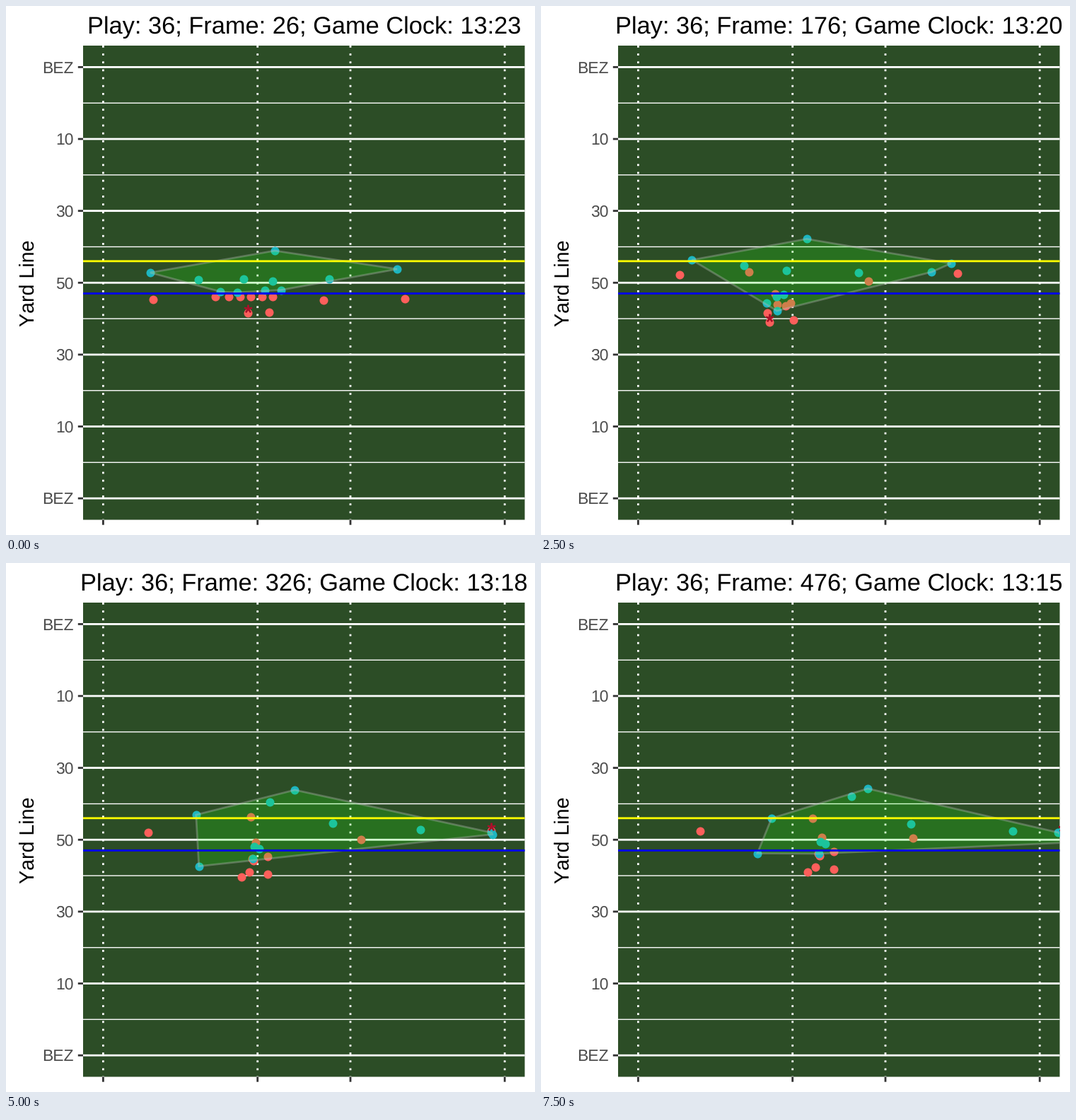
A matplotlib script for the animation above (8000 ms loop, 748 px wide and 748 px high).

```python
import numpy as np
import matplotlib.pyplot as plt
from matplotlib.animation import FuncAnimation
from matplotlib.patches import Polygon, Rectangle

plt.rcParams.update({
    "font.family": "Liberation Sans",
    "text.hinting": "no_hinting",
    "text.kerning_factor": 6,  # plain advances, no pair kerning
    "path.snap": False,
    "toolbar": "None",
})

SIZE = 748
DPI = 100
PT = 72 / DPI  # points per pixel
STEPS = 16
LEFT, RIGHT, TOP, BOTTOM = 109, 733.5, 56, 726.5
MIDFIELD, YARDS_20 = 391.3, 101.63
THICK = 2.79
RED, CYAN, BALL = "#FC5F5B", "#1DB6C0", "#A8122A"
BASE = 28.67  # base text size in pixels

TIME = np.arange(STEPS)[:, None]
KEYS = np.array([0, 3, 9, 15])  # set, read, break, finish


def smoothstep(u):
    u = np.clip(u, 0, 1)
    return u * u * (3 - 2 * u)


def route(*points):
    """Position at every step on a Hermite curve through four key points."""
    p = np.array(points, float)
    slope = np.gradient(p, KEYS, axis=0)
    k = np.clip(np.searchsorted(KEYS, TIME[:, 0], "right") - 1, 0, len(KEYS) - 2)
    span = (KEYS[k + 1] - KEYS[k])[:, None]
    u = (TIME - KEYS[k][:, None]) / span
    ease = smoothstep(u)
    return (p[k] + ease * (p[k + 1] - p[k])
            + span * u * (1 - u) * ((1 - u) * slope[k] - u * slope[k + 1]))


# The trench drifts as one group while each player shifts from his place in
# the formation to his place in the scrum.
pocket = route((346.5, 411), (338, 420), (347, 418), (397, 410))
engaged = smoothstep((TIME - 2) / 5)


def in_trench(formation, scrum):
    return pocket + (1 - engaged) * np.array(formation) + engaged * np.array(scrum)


scrum_places = [(-9, 20), (0, -22), (-5, 1), (17, -2), (-3, 4)]
blockers = [in_trench((15.5 * (i - 2), 0), place) for i, place in enumerate(scrum_places)]
passer = in_trench((-4, 23), (-20, 27))
runner = in_trench((26, 22), (17, 23))
rushers = [in_trench((-43, -7), (-4, 1)),
           in_trench((-19, -6), (5, -13)),
           in_trench((20, -9), (-2, -16))]

wide_right = route((564.5, 414), (562, 385), (673, 379), (737, 380))
receivers = [
    wide_right,
    route((208, 414.5), (199.5, 387), (198, 381.5), (225, 378.5)),
    route((296, 411), (283, 388), (338, 360.5), (384, 361)),
    route((449, 416), (452, 394), (496, 391.5), (526, 389)),
]
edge_rusher = route((389, 401.5), (364, 424), (274.5, 430.5), (306, 410.5))
safety = route((380, 346), (372, 335), (400, 322), (462, 319))
corners = [route((204, 377), (201, 364), (258, 356), (326, 361)),
           route((553, 372), (549, 361), (673, 380), (731, 381))]
backers = [route((272, 387), (266, 378), (359, 341.5), (439, 329.5)),
           route((336, 385.5), (319, 378), (446.5, 368), (523, 369)),
           route((377.5, 389), (404, 380), (565.5, 377), (667, 379)),
           route((457, 386), (501, 377), (669, 382), (750, 395))]

offense = np.stack([*receivers, *blockers, passer, runner], axis=1)
defense = np.stack([safety, *corners, *backers, *rushers, edge_rusher], axis=1)

# The ball leaves the passer's hands at step 5 and is caught at step 7.
flight = np.clip((TIME - 5) / 2, 0, 1)
ball_path = (1 - flight) * passer + flight * wide_right - [0, 6]


def convex_hull(points):
    def chain(ordered):
        out = []
        for p in ordered:
            while len(out) > 1:
                a, b = out[-1] - out[-2], p - out[-2]
                if a[0] * b[1] - a[1] * b[0] > 0:
                    break
                out.pop()
            out.append(p)
        return out[:-1]

    ordered = sorted(points, key=tuple)
    return np.array(chain(ordered) + chain(ordered[::-1]))


fig = plt.figure(figsize=(SIZE / DPI, SIZE / DPI), dpi=DPI, facecolor="white")
ax = fig.add_axes([0, 0, 1, 1])
ax.set(xlim=(0, SIZE), ylim=(SIZE, 0))
ax.axis("off")


def line(xs, ys, color, width=THICK, **kw):
    return ax.plot(xs, ys, color=color, lw=width * PT, solid_capstyle="butt",
                   dash_capstyle="butt", **kw)[0]


panel = Rectangle((LEFT, TOP), RIGHT - LEFT, BOTTOM - TOP, fc="#2C4D26", lw=0, zorder=0)
ax.add_patch(panel)

# Field grid, ticks and labels
for i in range(6):
    y = MIDFIELD + (i - 2.5) * YARDS_20
    line([LEFT, RIGHT], [y, y], "white", THICK / 2, zorder=1)
for i, label in enumerate(["BEZ", "10", "30", "50", "30", "10", "BEZ"]):
    y = MIDFIELD + (i - 3) * YARDS_20
    line([LEFT, RIGHT], [y, y], "white", zorder=1)
    line([LEFT - 7.2, LEFT], [y, y], "#333333")
    ax.text(96, y + 8.2, label, color="#4D4D4D", size=0.8 * BASE * PT,
            ha="right", va="baseline")
for x in (137.4, 355.7, 487, 705.2):
    line([x, x], [TOP, BOTTOM], "white", zorder=1, ls=(0, (1, 3)))
    line([x, x], [BOTTOM, BOTTOM + 7.2], "#333333")

ax.text(40, MIDFIELD, "Yard Line", size=BASE * PT, rotation=90,
        rotation_mode="anchor", ha="center", va="baseline")
title = ax.text((LEFT + RIGHT) / 2, 39, "", size=1.2 * BASE * PT,
                ha="center", va="baseline")


def dots(color, z):
    return line([], [], color, 0, marker="o", ms=12 * PT, mew=0, ls="none", zorder=z)


red_dots = dots(RED, 3)
cyan_dots = dots(CYAN, 4)
ball = line([], [], BALL, 0, marker=(5, 2, 0), ms=11.5 * PT, mew=2.2 * PT,
            ls="none", zorder=5)
hull = Polygon([(0, 0), (1, 0), (0, 1)], fc=(0.1, 1, 0.03, 0.2),
               ec=(0.75, 0.75, 0.75, 0.35), lw=THICK * PT, zorder=6)
ax.add_patch(hull)
for artist in (red_dots, cyan_dots, ball, hull):
    artist.set_clip_path(panel)

# First-down line and line of scrimmage
line([LEFT, RIGHT], [360.8, 360.8], "#FFFF00", zorder=7)
line([LEFT, RIGHT], [406.5, 406.5], "#0000F0", zorder=7)


def update(step):
    seconds = int(23.2 - 0.5 * step)
    title.set_text(f"Play: 36; Frame: {26 + 30 * step}; Game Clock: 13:{seconds}")
    red_dots.set_data(*offense[step].T)
    cyan_dots.set_data(*defense[step].T)
    ball.set_data(*ball_path[step][:, None])
    hull.set_xy(convex_hull(defense[step]))
    return title, red_dots, cyan_dots, ball, hull


anim = FuncAnimation(fig, update, frames=STEPS, interval=500, repeat=True,
                     repeat_delay=0, blit=False)
plt.show()
```
